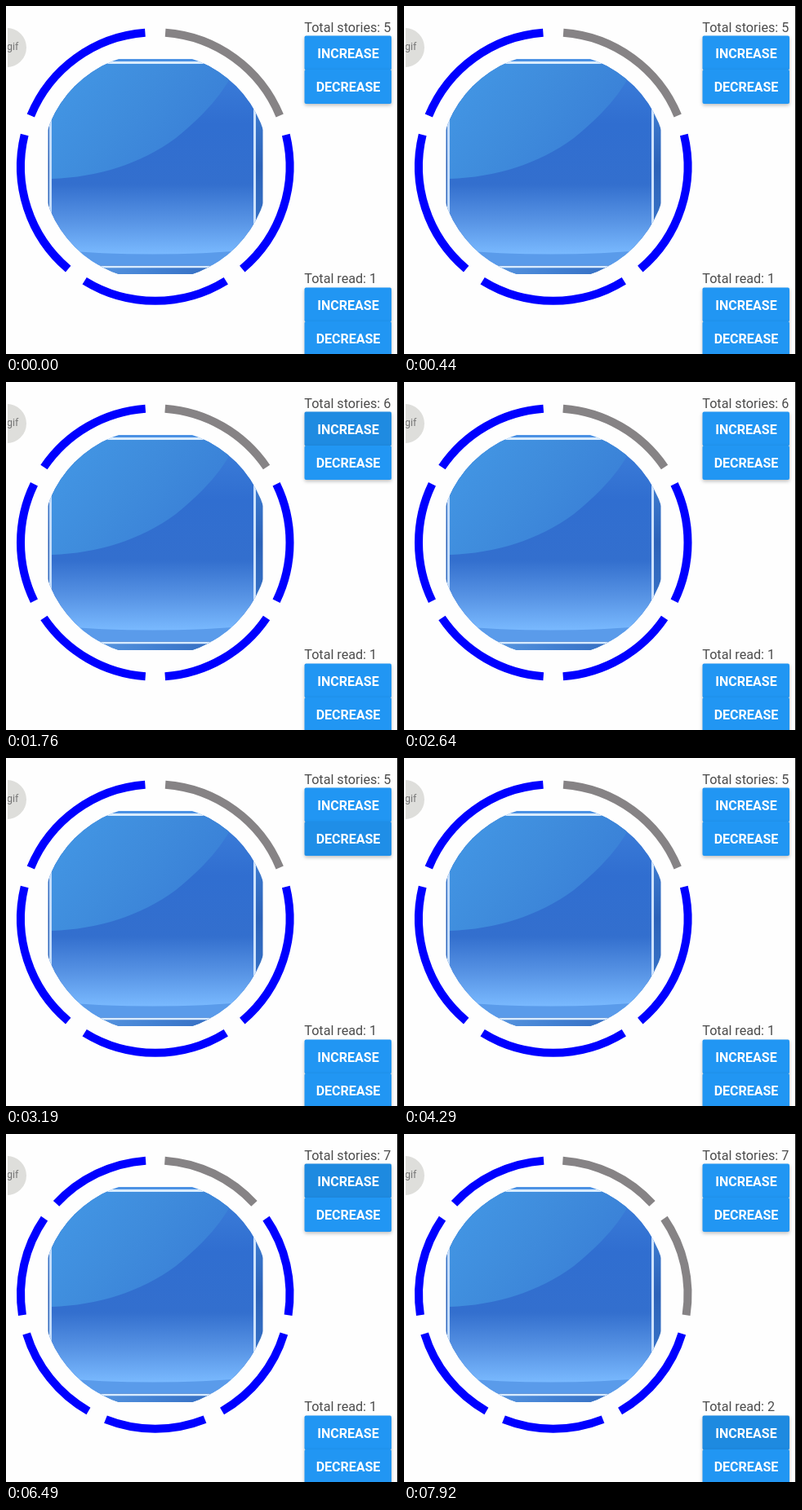
An HTML page that plays this animation: 480 px wide and 427 px high, repeating every 8 s.

```html
<!DOCTYPE html>
<html lang="en">
<head>
<meta charset="utf-8">
<title>Story ring</title>
<style>
  html, body { margin: 0; width: 100%; height: 100%; overflow: hidden; background: #fefefe; }
  svg { display: block; }
  text { font-family: Roboto, "Noto Sans", sans-serif; font-size: 16.15px; }
  .label { fill: #4c4c4c; }
  .caption { fill: #fff; font-size: 16px; font-weight: 700; text-anchor: middle; }
  .shadow { filter: drop-shadow(0 2px 2px rgba(0, 0, 0, .25)); }
</style>
</head>
<body>
<svg id="stage" width="480" height="427" viewBox="0 0 480 427">
  <defs>
    <linearGradient id="body" x1="0" y1="0" x2="0" y2="1">
      <stop offset="0" stop-color="#3d7fda"/>
      <stop offset=".3" stop-color="#306ed0"/>
      <stop offset=".6" stop-color="#336fce"/>
      <stop offset=".78" stop-color="#5793e4"/>
      <stop offset=".95" stop-color="#7abaff"/>
      <stop offset="1" stop-color="#70b0fa"/>
    </linearGradient>
    <linearGradient id="gloss" x1="0" y1="0" x2="1" y2=".5">
      <stop offset="0" stop-color="#4398e6"/>
      <stop offset=".5" stop-color="#3f8cdc"/>
      <stop offset="1" stop-color="#397ed6"/>
    </linearGradient>
    <linearGradient id="side" x1="0" y1="0" x2="0" y2="1">
      <stop offset="0" stop-color="#4c92e4"/>
      <stop offset=".5" stop-color="#2c62b8"/>
      <stop offset="1" stop-color="#3f7fd2"/>
    </linearGradient>
    <linearGradient id="base" x1="0" y1="0" x2="1" y2="0">
      <stop offset="0" stop-color="#68a6ea"/>
      <stop offset=".5" stop-color="#4280d2"/>
      <stop offset="1" stop-color="#2b5fb4"/>
    </linearGradient>
    <clipPath id="disc"><circle cx="183" cy="197" r="139.5"/></clipPath>
  </defs>

  <g clip-path="url(#disc)">
    <rect x="51.5" y="65" width="263" height="264" fill="url(#side)"/>
    <rect x="51.5" y="319" width="263" height="10" fill="url(#base)"/>
    <rect x="56" y="70" width="247" height="248" fill="url(#body)"/>
    <path d="M56 70H283C270 105 240 136 208 162C165 194 112 210 56 212Z" fill="url(#gloss)"/>
    <path d="M56 299Q180 310 303 299V318H56Z" fill="#5a9bea"/>
    <path d="M56 69.5H304" stroke="#d9ecff" stroke-width="3"/>
    <path d="M54.5 70V319" stroke="#c3dcfa" stroke-width="3"/>
    <path d="M304.5 70V319" stroke="#cde2fc" stroke-width="3"/>
    <path d="M56 320H304" stroke="#d9ecff" stroke-width="2.5"/>
  </g>

  <g id="ring" fill="none" stroke-width="10"></g>

  <svg x="2" y="20" width="30" height="60">
    <circle cx="-1" cy="31" r="24" fill="#dededb"/>
    <text x="-1" y="34" style="font-size:12.5px" fill="#777">gif</text>
  </svg>

  <text id="total" class="label" x="365.3" y="32"></text>
  <text id="read" class="label" x="365.3" y="340"></text>
  <g id="buttons"></g>
  <rect x="479" width="1" height="427" fill="#111"/>
</svg>
<script>
const LOOP = 8000, CLICK_DELAY = 150;
const $ = id => document.getElementById(id);

// Each press: start time, button index, resulting total and read counts
const presses = [
  [1480, 0, 6, 1],
  [2800, 1, 5, 1],
  [5060, 0, 6, 1],
  [6300, 0, 7, 1],
  [7700, 2, 7, 2]
];

$('buttons').innerHTML = [36.5, 78, 345.5, 387].map((y, i) => `
  <g class="shadow"><rect x="365.5" y="${y}" width="106.5" height="42" rx="2" fill="#2196f3"/></g>
  <svg x="365.5" y="${y}" width="106.5" height="41.5">
    <circle class="ripple" cx="53" cy="21" r="0"/>
  </svg>
  <text class="caption" x="419" y="${y + 27}">${i % 2 ? 'DECREASE' : 'INCREASE'}</text>`).join('');
const ripples = [...document.querySelectorAll('.ripple')];

function point(deg) {
  const a = deg * Math.PI / 180;
  return `${182.75 + 164.75 * Math.sin(a)} ${197 - 164.75 * Math.cos(a)}`;
}

function drawRing(total, read) {
  const step = 360 / total, gap = 4.9 - total * .12;
  let arcs = '';
  for (let i = 0; i < total; i++) {
    const from = point(i * step + gap), to = point((i + 1) * step - gap);
    arcs += `<path d="M${from}A164.75 164.75 0 0 1 ${to}" stroke="${i < read ? '#868385' : '#00f'}"/>`;
  }
  $('ring').innerHTML = arcs;
  $('total').textContent = `Total stories: ${total}`;
  $('read').textContent = `Total read: ${read}`;
}

let shown = '';
function frame() {
  const t = performance.now() % LOOP;
  let state = [5, 1];
  ripples.forEach(r => r.setAttribute('opacity', 0));
  for (const [start, button, total, read] of presses) {
    const age = t - start;
    if (age >= CLICK_DELAY) state = [total, read];
    if (age >= 0 && age < 650) {
      const grow = Math.min(1, age / 190);
      ripples[button].setAttribute('r', 60 * (1 - (1 - grow) ** 2));
      ripples[button].setAttribute('opacity', .08 * Math.min(1, (650 - age) / 400));
    }
  }
  if (shown !== String(state)) {
    shown = String(state);
    drawRing(...state);
  }
  requestAnimationFrame(frame);
}
frame();
</script>
</body>
</html>
```
